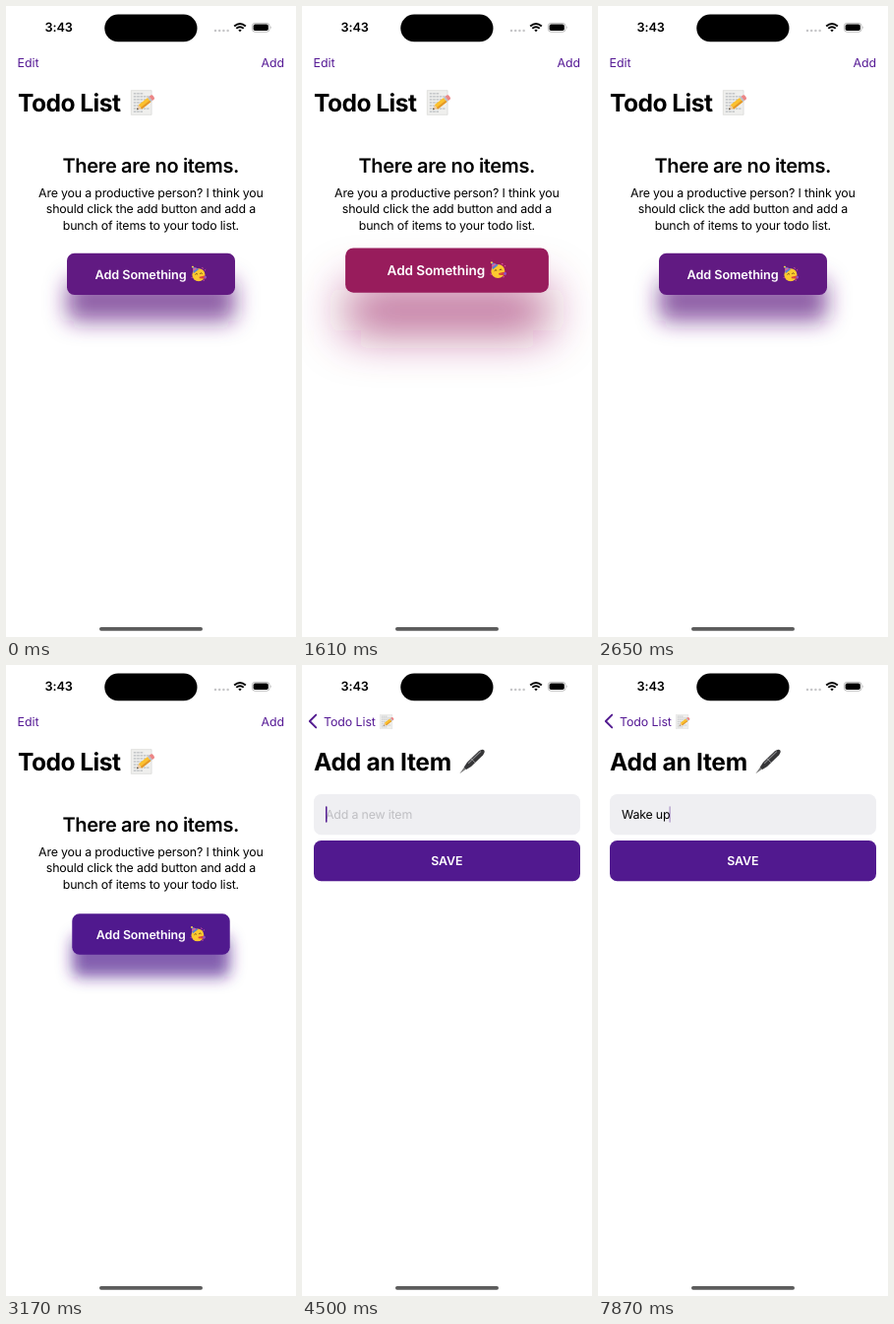
Recreate the animation shown at these times as an HTML page. Size 295 px wide and 640 px high, loop 8000 ms.

```html
<!DOCTYPE html>
<html lang="en">
<head>
<meta charset="utf-8">
<title>Todo list</title>
<style>
  html, body { margin: 0; width: 100%; height: 100%; overflow: hidden; background: #fff; }
  svg { display: block; width: 100vw; height: 100vh; }
  text {
    font: 400 12.4px Inter, "Liberation Sans", sans-serif;
    font-optical-sizing: none;
    letter-spacing: -.18px;
    text-rendering: geometricPrecision;
    white-space: pre;
  }
  .mid { text-anchor: middle; }
  .semi { font-weight: 600; letter-spacing: -.1px; }
  .nav { letter-spacing: -.08px; fill: #561a95; }
  .large { font-size: 24.6px; font-weight: 700; letter-spacing: -.55px; }
  .head { font-size: 20px; font-weight: 600; letter-spacing: -.35px; }
</style>
</head>
<body>
<svg viewBox="0 0 295 640" preserveAspectRatio="none">
  <defs>
    <filter id="blur" filterUnits="userSpaceOnUse" x="-240" y="-120" width="480" height="300">
      <feGaussianBlur id="blurAmount" stdDeviation="10"/>
    </filter>
    <symbol id="memo" viewBox="0 0 24 24">
      <path d="M1.2 .6H20.4V23.4H1.2Z" fill="#efefed" stroke="#cdcdcb" stroke-width=".5"/>
      <path d="M3.5 3.6H13M3.5 6.4H18M3.5 9.2H17M3.5 12H18M3.5 14.8H16M3.5 17.6H18M3.5 20.4H12"
        stroke="#a3a7ad" stroke-width=".8" stroke-dasharray="2.4 .7"/>
      <g transform="translate(6.4 18.6) rotate(-38)">
        <path d="M0 0 4.2-2.5V2.5Z" fill="#efcaa0"/>
        <path d="M0 0 1.6-.95V.95Z" fill="#444"/>
        <path d="M4.2-2.5H15V2.5H4.2Z" fill="#fbc02d"/>
        <path d="M4.2 .8H15V2.5H4.2Z" fill="#e3962a"/>
        <path d="M15-2.5H16.8V2.5H15Z" fill="#b9bec4"/>
        <path d="M16.8-2.5H18.8Q20.2-2.3 20.2 0T18.8 2.5H16.8Z" fill="#ec8585"/>
      </g>
    </symbol>
    <symbol id="party" viewBox="0 0 24 24">
      <circle cx="12" cy="13.6" r="9.6" fill="#fdc92f"/>
      <path d="M3.2 1 12.6 5.2 4.4 11.6Z" fill="#5a7fd0"/>
      <path d="M3.4 4.6 7.6 3 9.6 3.9 3.9 8Z" fill="#e0609a"/>
      <circle cx="3.2" cy="1.6" r="1.5" fill="#f4d54a"/>
      <path d="M7 13.2Q8.6 10.8 10.4 12.6M14 12Q15.8 9.8 17.4 11.8" fill="none" stroke="#5d3a17" stroke-width="1.3"/>
      <path d="M13 16.4 22 14.4 22.6 19.4 13.4 18.6Z" fill="#d9443f"/>
      <circle cx="22" cy="17" r="2" fill="#8e53c4"/>
      <path d="M17 3l2 1M21 7l1.6-1.4M1.4 17l1.4 1.6M19 22l1.8-.8" stroke="#e0569b" stroke-width="1.4"/>
    </symbol>
    <symbol id="pen" viewBox="0 0 26 26">
      <g transform="translate(.8 24.8) rotate(-44)">
        <path d="M0 0 8-1.5 9 1.4Z" fill="#777"/>
        <path d="M7.6-1.6 13-2.9H29Q33-2.4 33.2 0 33 2.3 29 2.8H13L7.6 1.6Z" fill="#363638"/>
        <path d="M13-1.3H30" stroke="#8a8a8d" stroke-width="1"/>
        <path d="M18.4-2.9V2.8" stroke="#a5a5a8" stroke-width=".7"/>
      </g>
    </symbol>
  </defs>

  <rect width="295" height="640" fill="#fff"/>

  <g id="listPage">
    <text class="head mid" x="147.3" y="168.6">There are no items.</text>
    <g class="mid">
      <text x="147.4" y="193.8">Are you a productive person? I think you</text>
      <text x="147.4" y="210.4">should click the add button and add a</text>
      <text x="147.4" y="227">bunch of items to your todo list.</text>
    </g>
    <g id="cta">
      <rect id="ctaShadow" height="41.3" rx="7.5" fill-opacity=".7" filter="url(#blur)"/>
      <rect id="ctaBack" y="-20.65" height="41.3" rx="7.5"/>
      <text class="semi" x="-55.6" y="4.6" fill="#fff">Add Something</text>
      <use href="#party" x="39.3" y="-8.2" width="16" height="16"/>
    </g>
  </g>
  <rect id="dim" width="295" height="640"/>

  <g id="formPage">
    <rect width="295" height="640" fill="#fff"/>
    <rect x="12" y="131" width="271" height="41.3" rx="7.5" fill="#efeff2"/>
    <text id="hint" x="24" y="156.4" fill="#bfbfc3">Add a new item</text>
    <text id="entry" x="24" y="156.4"></text>
    <rect id="caret" y="143.2" width="1.5" height="16.6" rx=".7" fill="#51198f"/>
    <rect x="12" y="178" width="271" height="41.3" rx="7.5" fill="#51198f"/>
    <text class="semi mid" x="147.3" y="203.3" fill="#fff">SAVE</text>
  </g>

  <g id="formTitle">
    <text class="large" x="12" y="106.6" style="letter-spacing:-.3px">Add an Item</text>
    <use href="#pen" x="159.5" y="84.5" width="27" height="27"/>
  </g>
  <g id="actions">
    <text class="nav" x="11.6" y="61.6">Edit</text>
    <text class="nav" x="283" y="61.6" text-anchor="end">Add</text>
  </g>
  <text id="bigTitle" class="large">Todo List</text>
  <text id="backTitle" class="nav">Todo List</text>
  <use id="titleIcon" href="#memo"/>
  <path id="chevron" d="M14.2 50.6 7.8 57 14.2 63.4" fill="none" stroke="#51198f" stroke-width="1.9"
    stroke-linecap="round" stroke-linejoin="round"/>

  <text class="semi" x="39.6" y="26.4" style="font-size:12.7px">3:43</text>
  <rect x="100.3" y="8.6" width="94.2" height="27.6" rx="13.8"/>
  <g fill="#c6c6c8">
    <circle cx="213" cy="25" r="1.25"/><circle cx="217.2" cy="25" r="1.25"/>
    <circle cx="221.4" cy="25" r="1.25"/><circle cx="225.6" cy="25" r="1.25"/>
  </g>
  <g fill="none" stroke="#000" stroke-width="1.9">
    <path d="M232.2 20.5Q238 15.3 243.8 20.5M234.3 22.8Q238 19.5 241.7 22.8"/>
    <path d="M236.3 24.4Q238 23.1 239.7 24.4L238 26.3Z" fill="#000" stroke="none"/>
  </g>
  <rect x="250.4" y="17.4" width="17.6" height="8.8" rx="2.8" fill="none" stroke="#a9a9a9" stroke-width=".8"/>
  <rect x="251.6" y="18.6" width="15.2" height="6.4" rx="1.8"/>
  <path d="M269 20.3Q270.4 21.8 269 23.3Z" fill="#a9a9a9"/>
  <rect x="95" y="630" width="105" height="3.7" rx="1.85" fill="#5c5c5c"/>
</svg>

<script>
const LOOP = 8000, W = 295, PT = W / 393;
const ACCENT = [79, 25, 143], SECOND = [155, 28, 90];
const PULSE_PEAK = 1325, PULSE_HALF = 2000, PUSH_START = 3165;

// The screen refreshes in runs of [first, last, count] ms
const RUNS = [[0, 0, 1], [100, 850, 8], [950, 1610, 7], [1730, 2550, 9], [2650, 3370, 8], [3480, 3600, 2]];
const ticks = RUNS.flatMap(([a, b, n]) =>
  Array.from({ length: n }, (_, i) => n > 1 ? a + (b - a) * i / (n - 1) : a));

// [time, characters typed, caret x, caret opacity]
const TYPING = [
  [0, 0, 24, 0], [4500, 0, 24, 1], [5020, 0, 24, 0], [5620, 1, 35.6, 1],
  [6000, 2, 42.6, 1], [6210, 3, 49, 1], [6340, 4, 55, 1], [6500, 5, 57.8, 1],
  [6960, 6, 65.4, 1], [7240, 7, 72.4, 1], [7750, 7, 72.4, .7], [7870, 7, 72.4, .35]
];
const PHRASE = "Wake up";

const el = {};
document.querySelectorAll("[id]").forEach(n => el[n.id] = n);
const set = (node, attrs) => { for (const k in attrs) node.setAttribute(k, attrs[k]); };
const mix = (a, b, p) => a + (b - a) * p;
const place = (x, y, s = 1) => `translate(${x} ${y}) scale(${s})`;

// cubic-bezier(.42, 0, .58, 1)
function easeInOut(x) {
  let lo = 0, hi = 1, s = .5;
  for (let i = 0; i < 24; i++) {
    s = (lo + hi) / 2;
    const bx = 1.26 * s * (1 - s) ** 2 + 1.74 * s * s * (1 - s) + s ** 3;
    if (bx < x) lo = s; else hi = s;
  }
  return s * s * (3 - 2 * s);
}

// Critically damped spring
function spring(ms) {
  if (ms <= 0) return 0;
  const x = ms * .0183;
  return 1 - (1 + x) * Math.exp(-x);
}

function drawButton(t, push) {
  const p = easeInOut(Math.abs(1 - Math.abs(t - PULSE_PEAK) / PULSE_HALF));
  const width = mix(213, 253, p) * PT;
  const fill = `rgb(${ACCENT.map((c, i) => Math.round(mix(c, SECOND[i], p)))})`;
  set(el.cta, {
    transform: place(W / 2, 273.1 - 7 * PT * p, 1 + .1 * p),
    opacity: push > 0 ? .9 : 1
  });
  set(el.ctaBack, { x: -width / 2, width, fill });
  set(el.ctaShadow, { x: -width / 2, y: -20.65 + mix(30, 50, p) * PT, width, fill });
  set(el.blurAmount, { stdDeviation: mix(10, 30, p) * PT });
}

function drawPush(p) {
  const edge = W * (1 - p);
  set(el.listPage, { transform: place(-.3 * W * p, 0) });
  set(el.dim, { opacity: .1 * p });
  set(el.formPage, { transform: place(edge, 0) });
  set(el.formTitle, { transform: place(1.12 * edge, 0) });
  set(el.actions, { opacity: 1 - p });

  const x = mix(12, 22, p), y = mix(106.6, 61.6, p);
  set(el.bigTitle, { transform: place(x, y, mix(1, .5, p)), opacity: 1 - p });
  set(el.backTitle, { transform: place(x, y, mix(1.96, 1, p)), opacity: p });
  const size = mix(26, 15.4, p);
  set(el.titleIcon, { x: mix(126, 78.6, p), y: mix(85, 49.8, p), width: size, height: size });
  set(el.chevron, { opacity: Math.max(0, p * 10 - 9) });
}

function drawEntry(t) {
  const [, count, x, opacity] = TYPING.findLast(k => k[0] <= t);
  el.entry.textContent = PHRASE.slice(0, count);
  set(el.hint, { opacity: count ? 0 : 1 });
  set(el.caret, { x, opacity });
}

function render(time) {
  const t = time % LOOP;
  const shown = ticks.findLast(k => k <= t);
  const push = shown >= 3600 ? 1 : spring(shown - PUSH_START);
  drawButton(shown, push);
  drawPush(push);
  drawEntry(t);
}

const start = performance.now();
function frame() {
  render(performance.now() - start);
  requestAnimationFrame(frame);
}
frame();
</script>
</body>
</html>
```
